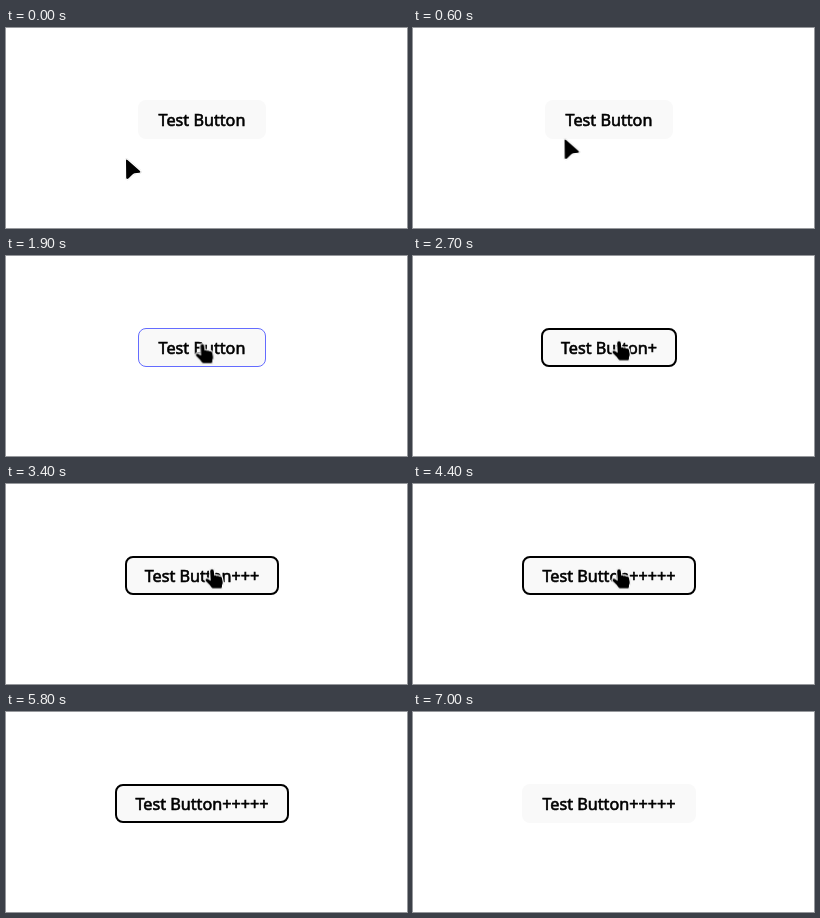
An HTML page for the animation above (7300 ms loop, 401x200 px).

```html
<!DOCTYPE html>
<html lang="en">
<head>
<meta charset="utf-8">
<title>Test Button</title>
<style>
  html, body { margin: 0; width: 100%; height: 100%; overflow: hidden; background: #fff; }
  /* The small negative delay keeps each step safely ahead of its 100 ms tick. */
  .button, .label::after, .cursor, .arrow, .hand {
    animation: 7.3s step-end -20ms infinite;
  }
  .button {
    position: absolute; top: 72px; height: 39px; box-sizing: border-box;
    display: flex; align-items: center; justify-content: center;
    border: 1px solid transparent; border-radius: 8px;
    background: #f9f9f9; color: #000;
    font: 16.2px/1 "Noto Sans", "Open Sans", sans-serif;
    animation-name: grow, outline;
  }
  .label { position: relative; top: 1px; white-space: pre; -webkit-text-stroke: .6px #000; }
  .label::after { content: ""; animation-name: count; }
  svg { position: absolute; inset: 0; width: 401px; height: 200px; }
  .cursor { animation-name: move; filter: drop-shadow(0 .5px .5px #0004); }
  .cursor path { fill: #000; stroke: #fff; stroke-width: 2.2; stroke-linejoin: round; paint-order: stroke; }
  .arrow { animation-name: arrow; }
  .hand { animation-name: hand; }

  @keyframes grow {
    0%      { left: 132px; width: 128px; }
    30.137% { left: 128px; width: 136px; }
    39.726% { left: 123px; width: 146px; }
    46.575% { left: 119px; width: 154px; }
    52.055% { left: 114px; width: 164px; }
    60.274%, 100% { left: 109px; width: 174px; }
  }
  @keyframes count {
    0%      { content: ""; }
    30.137% { content: "+"; }
    39.726% { content: "++"; }
    46.575% { content: "+++"; }
    52.055% { content: "++++"; }
    60.274%, 100% { content: "+++++"; }
  }
  @keyframes outline {
    0%      { border: 1px solid #646cff00; }
    8.219%  { border: 1px solid #646cff00; animation-timing-function: steps(3); }
    12.329% { border: 1px solid #646cff; }
    30.137% { border: 2px solid #000; }
    95.89%, 100% { border: 1px solid #646cff00; }
  }
  @keyframes move {
    0%      { transform: translate(120px, 131px); }
    1.37%   { transform: translate(120px, 131px); animation-timing-function: steps(8); }
    12.329% { transform: translate(170.5px, 99px); animation-timing-function: steps(4); }
    17.808% { transform: translate(186px, 92.5px); }
    20.548% { transform: translate(188.5px, 89.5px); }
    21.918% { transform: translate(188.5px, 89.5px); animation-timing-function: steps(4); }
    27.397% { transform: translate(199px, 88px); animation-timing-function: steps(3); }
    31.507% { transform: translate(201px, 86px); }
    34.247% { transform: translate(201px, 86px); animation-timing-function: steps(2); }
    36.986% { transform: translate(206px, 85.5px); }
    69.863% { transform: translate(206px, 85.5px); animation-timing-function: steps(3); }
    73.973% { transform: translate(170.5px, 62.5px); animation-timing-function: steps(3); }
    78.082%, 100% { transform: translate(118.5px, 17.5px); }
  }
  @keyframes arrow {
    0%      { visibility: visible; }
    9.589%  { visibility: hidden; }
    72.603% { visibility: visible; }
    79.452%, 100% { visibility: hidden; }
  }
  @keyframes hand {
    0%      { visibility: hidden; }
    9.589%  { visibility: visible; }
    72.603%, 100% { visibility: hidden; }
  }
</style>
</head>
<body>
  <div class="button"><span class="label">Test Button</span></div>
  <svg viewBox="0 0 401 200" aria-hidden="true">
    <g class="cursor">
      <path class="arrow" d="M0 1.6Q0 -.2 1.5 .9L14 11.9Q15.2 13.4 13.4 13.7L8.6 14.2Q7.4 14.4 6.5 15.4L2.4 19.6Q.6 20.8 .2 18.8Z"/>
      <path class="hand" d="M-1.8 1.4Q-1.6 -.2 0 -.2Q1.7 -.2 1.8 1.6L2.3 6.3Q3.5 5.3 4.7 6.6Q6.2 5.8 7.2 7.1Q9.1 6.4 9.9 8.3L10.7 12.4Q10.9 14.2 10 15.6L9.9 17.7Q9.8 18.7 8.7 18.7L.8 18.7Q-.2 18.7-.8 17.6L-2.2 15.6L-6.2 11.5Q-7.1 9.7-5.5 9.2Q-4.2 9-3 10.2L-1.3 11.2Z"/>
    </g>
  </svg>
</body>
</html>
```
